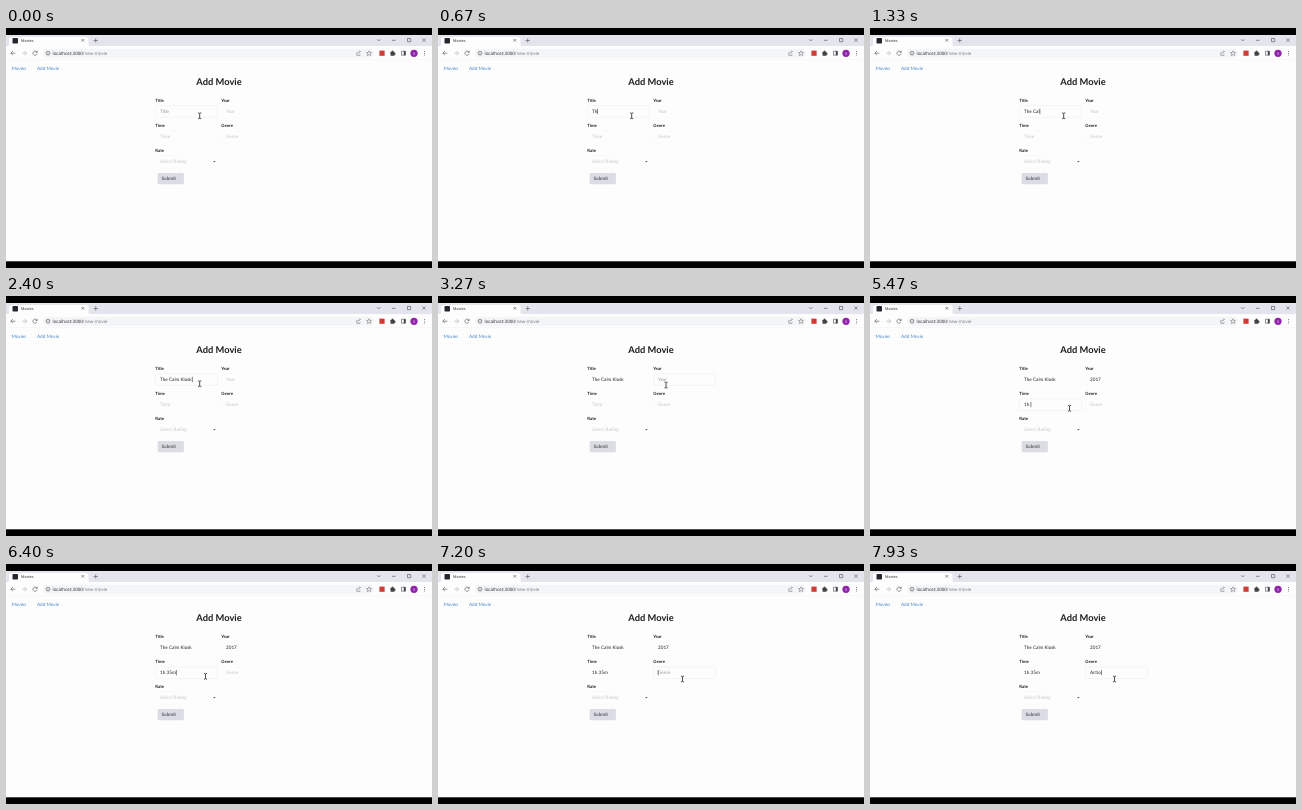
An HTML page for the animation above (8 s loop, 426 by 240 pixels).

```html
<!DOCTYPE html>
<html lang="en">
<head>
<meta charset="utf-8">
<title>Movie form</title>
<style>
  html, body { margin: 0; height: 100%; overflow: hidden; background: #000; }
  svg { display: block; width: 100vw; height: 100vh; }
  text { font: 4.67px Lato, sans-serif; fill: #222; text-rendering: geometricPrecision; white-space: pre; }
  .ui { font-family: "Open Sans", sans-serif; font-size: 4.5px; fill: #202124; }
  .heading { font-size: 9.33px; font-weight: 700; text-anchor: middle; fill: #1b1c1d; }
  .label { font-size: 4.3px; font-weight: 700; }
  .link { fill: #4b86c8; }
  .hint { fill: #c6c6cc; }
  .hint.active { fill: #96969c; }
  .box { fill: none; stroke: #f9f9fa; stroke-width: .5; }
  .box.active { stroke: #ebedf0; }
  .icon { fill: none; stroke: #5f6368; stroke-width: .7; }
</style>
</head>
<body>
<svg viewBox="0 0 426 240">
  <rect width="426" height="240"/>
  <rect y="7" width="426" height="12" fill="#e4e5ec"/>
  <path d="M1 18.5q2 0 2-2v-5q0-2.5 2.5-2.5h74.500q2.500 0 2.500 2.500v5q0 2 2 2z" fill="#fdfdfd"/>
  <rect y="18" width="426" height="14" fill="#fdfdfd"/>
  <rect y="31.6" width="426" height=".4" fill="#ececef"/>
  <rect y="32" width="426" height="201.3" fill="#fdfdfd"/>

  <rect x="6.500" y="10" width="5.500" height="5.500" rx=".8" fill="#23272f"/>
  <text class="ui" x="15" y="14" style="font-size:3.8px">Movies</text>
  <g class="icon">
    <path d="M75.500 11l2.600 2.600m0-2.600l-2.600 2.600M87.600 12.500h4.200m-2.100-2.100v4.200"/>
    <path d="M371 11.300l1.700 1.700 1.700-1.700M386 12.300h3.600M401.500 10.500h3.200v3.200h-3.200zM416.400 10.500l3.200 3.200m0-3.200l-3.200 3.200"/>
    <path d="M9.400 25.200h-4.600m2.100-2.100l-2.100 2.100 2.100 2.100"/>
    <path d="M16 25.200h4.600m-2.100-2.100l2.100 2.100-2.100 2.100" stroke="#b5b8bc"/>
    <path d="M30.900 24.300a2.100 2.100 0 1 0 .1 1.600M31.200 22.800v1.700h-1.700"/>
  </g>
  <rect x="37" y="20.700" width="331" height="9" rx="4.500" fill="#f4f5f7"/>
  <g class="icon">
    <circle cx="42" cy="25.200" r="1.900"/>
    <path d="M42 25v1.200M42 24v.5" stroke-width=".5"/>
    <path d="M350.800 24v3.300h3.200v-1.200M351.800 25.600q.3-2 2.500-2m-1-1l1 1-1 1" stroke-width=".5"/>
    <path d="M363 22.800l.7 1.600 1.800.2-1.300 1.200.4 1.700-1.600-.9-1.600.9.400-1.700-1.300-1.200 1.800-.2z" stroke-width=".5"/>
    <path d="M395.500 23.200h4v4h-4z"/>
  </g>
  <rect x="373.400" y="22.600" width="5.200" height="5.200" fill="#d33a33"/>
  <g fill="#3f4347">
    <rect x="384.500" y="23.800" width="4" height="4" rx=".4"/>
    <circle cx="386.500" cy="23.500" r=".9"/>
    <circle cx="388.700" cy="25.800" r=".9"/>
    <path d="M397.800 23.200h1.700v4h-1.700z"/>
  </g>
  <circle cx="408" cy="25.300" r="3.600" fill="#9021ab"/>
  <text class="ui" x="408" y="26.600" text-anchor="middle" style="font-size:3.6px;fill:#fff">V</text>
  <g fill="#5f6368"><circle cx="418.500" cy="23.500" r=".5"/><circle cx="418.500" cy="25.200" r=".5"/><circle cx="418.500" cy="26.900" r=".5"/></g>
  <text class="ui" x="46.500" y="26.800">localhost:3000<tspan fill="#777b80">/new-movie</tspan></text>

  <text class="link" x="5.500" y="42">Movies</text>
  <text class="link" x="31" y="42">Add Movie</text>
  <rect y="47.300" width="426" height=".3" fill="#f5f5f7"/>
  <text class="heading" x="213" y="57">Add Movie</text>

  <g id="form"></g>
  <text class="label" x="149.300" y="124">Rate</text>
  <rect class="box" x="149.500" y="127.700" width="62" height="11.800" rx="1.300"/>
  <text class="hint" x="154" y="135.200">Select Rating</text>
  <path d="M207.200 133h2.400l-1.200 1.300z" fill="#444"/>
  <rect x="151.700" y="145" width="26.200" height="11.300" rx="1.300" fill="#dcdce5"/>
  <text x="155.500" y="152.300" style="font-weight:700;fill:#5a5a60">Submit</text>

  <rect id="caret" width=".5" height="5.400" fill="#111"/>
  <path id="pointer" d="M-1.600-2.900q1.300 0 1.600.6.300-.6 1.600-.6M0-2.300V2.300M-1.600 2.900q1.300 0 1.600-.6.300.6 1.600.6" fill="none" stroke="#222" stroke-width=".8"/>
</svg>
<script>
const LOOP = 8000, STEP = 1000 / 15, BLINK = 530;

// focus: when the field is clicked; first/every: typing rhythm
const fields = [
  { label: 'Title', value: 'The Calm Kiosk', x: 149.5, y: 72,   focus: -530, first: 480,  every: 130 },
  { label: 'Year',  value: '2017',           x: 215.5, y: 72,   focus: 2700, first: 3420, every: 150 },
  { label: 'Time',  value: '1h 35m',         x: 149.5, y: 97.2, focus: 4400, first: 4930, every: 235 },
  { label: 'Genre', value: 'Actio',          x: 215.5, y: 97.2, focus: 7000, first: 7270, every: 140 }
];

// [start, end, x, y] of each pointer move
const moves = [
  [0, 0, 193.7, 87.8],
  [2470, 2680, 228, 89],
  [4030, 4350, 199.5, 112.3],
  [6530, 6950, 244.5, 115]
];

const form = document.getElementById('form');
const caret = document.getElementById('caret');
const pointer = document.getElementById('pointer');

function add(tag, attrs, content = '') {
  const node = document.createElementNS('http://www.w3.org/2000/svg', tag);
  for (const key in attrs) node.setAttribute(key, attrs[key]);
  node.textContent = content;
  return form.appendChild(node);
}

for (const f of fields) {
  add('text', { class: 'label', x: f.x - .2, y: f.y + 1.6 }, f.label);
  f.box = add('rect', { class: 'box', x: f.x, y: f.y + 5.6, width: 62, height: 11.8, rx: 1.3 });
  f.text = add('text', { x: f.x + 4.5, y: f.y + 13.1 });
}

function pointerAt(t) {
  let x = moves[0][2], y = moves[0][3];
  for (const [start, end, toX, toY] of moves.slice(1)) {
    const p = Math.min(1, Math.max(0, (t - start) / (end - start)));
    const eased = p * p * (3 - 2 * p);
    x += (toX - x) * eased;
    y += (toY - y) * eased;
  }
  return [x, y];
}

function draw(t) {
  const active = fields.filter(f => t >= f.focus).pop();
  for (const f of fields) {
    const typed = Math.floor((t - f.first) / f.every) + 1;
    f.count = Math.min(f.value.length, Math.max(0, typed));
    f.text.textContent = f.count ? f.value.slice(0, f.count) : f.label;
    f.text.classList.toggle('hint', !f.count);
    for (const part of [f.text, f.box]) part.classList.toggle('active', f === active);
  }
  const { count, text, first, every, focus, x, y } = active;
  const lastKey = count ? first + (count - 1) * every : focus;
  const blinkOn = Math.floor((t - lastKey) / BLINK) % 2 === 0;
  caret.setAttribute('x', x + 4.5 + (count ? text.getComputedTextLength() + .2 : -.2));
  caret.setAttribute('y', y + 8.7);
  caret.setAttribute('visibility', blinkOn ? 'visible' : 'hidden');
  pointer.setAttribute('transform', `translate(${pointerAt(t)})`);
}

const begin = performance.now();
function tick() {
  const t = (performance.now() - begin) % LOOP;
  draw(Math.floor((t + 4) / STEP) * STEP);
  requestAnimationFrame(tick);
}
tick();
</script>
</body>
</html>
```
